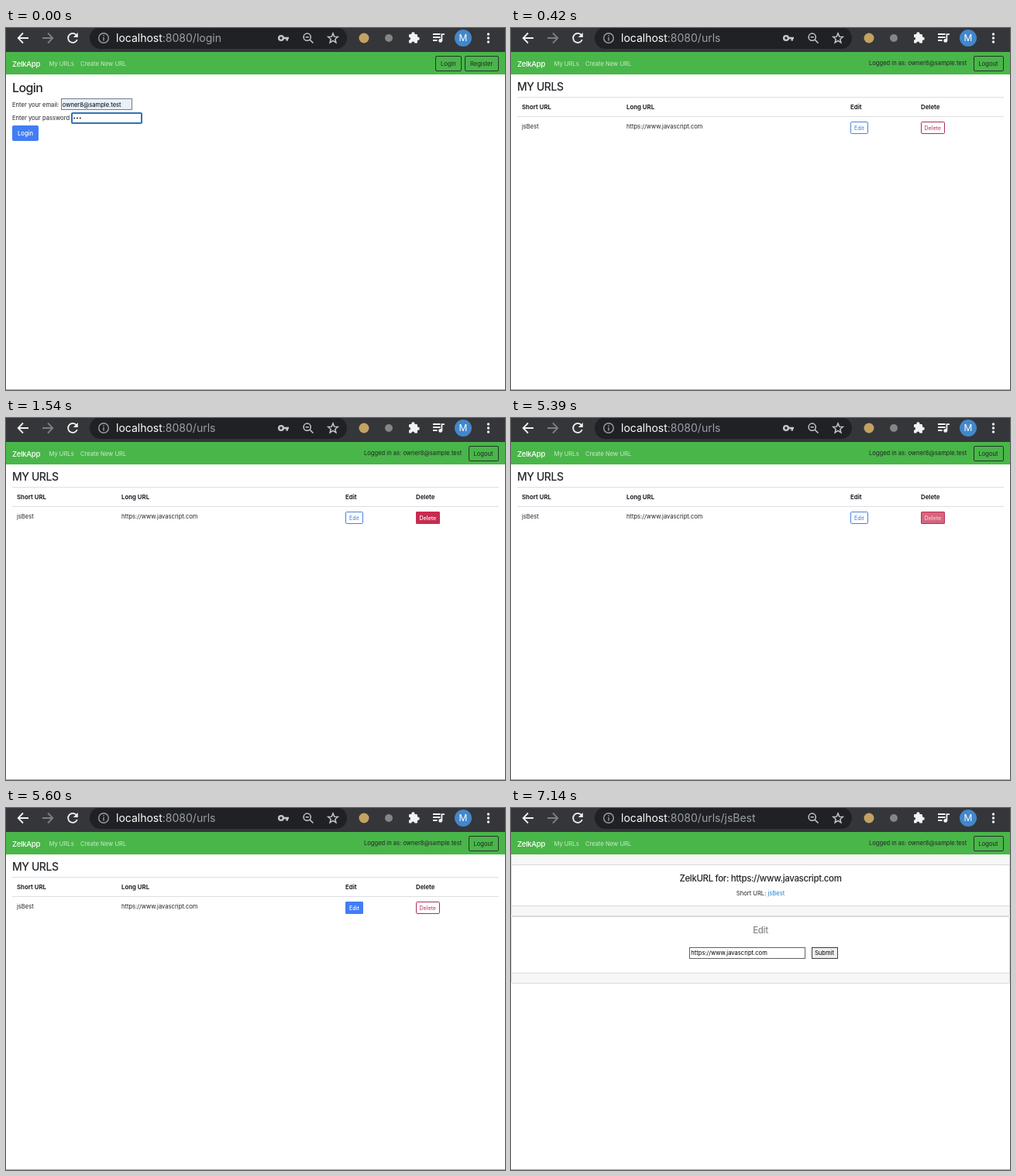
Write an HTML page that moves like this. It is 644 px wide and 468 px high and loops after 8 s.

```html
<!DOCTYPE html>
<html lang="en">
<head>
<meta charset="utf-8">
<title>Short URL app</title>
<style>
html, body { margin: 0; width: 100%; height: 100%; overflow: hidden; background: #fff; }
svg { display: block; width: 644px; height: 468px; font: 7.6px Inter, "Open Sans", sans-serif; fill: #212529; }
text { white-space: pre; }
.url { font-size: 14px; fill: #9aa0a6; }
.host { fill: #fff; }
.brand { font-size: 9.6px; font-weight: 500; letter-spacing: -.3px; fill: #fff; }
.nav { fill: #fff; fill-opacity: .72; }
.h2 { font-size: 16px; font-weight: 500; letter-spacing: -.6px; }
.h3 { font-size: 14px; font-weight: 500; letter-spacing: -.45px; }
.h5 { font-size: 11.5px; font-weight: 500; letter-spacing: -.36px; text-anchor: middle; }
.th { font-size: 7.8px; font-weight: 700; }
.small { font-size: 7.1px; }
.on { fill: #fff; font-weight: 500; }
.line { fill: none; stroke-width: 1.8; }
.dark { fill: none; stroke: #26332b; }
.rule { stroke: #dcdfe2; }
.strip { fill: #f7f7f7; stroke: #d9d9d9; }
</style>
</head>
<body>
<svg viewBox="0 0 644 468">
  <rect width="644" height="468" fill="#fff"/>

  <!-- browser toolbar -->
  <rect width="644" height="31" fill="#35363a"/>
  <rect x="108" y="-1" width="332" height="28" rx="14" fill="#202124"/>
  <g class="line" stroke="#f1f3f4">
    <path d="M29 13H16M22 6.5L15.7 13L22 19.5"/>
    <path d="M47 13H60M54 6.5L60.3 13L54 19.5" stroke="#7d7f83"/>
    <g id="reload">
      <path d="M91.2 9.6A6 6 0 1 0 91.8 15"/>
      <path d="M92.8 6V12H86.8Z" fill="#f1f3f4" stroke="none"/>
    </g>
    <path id="stop" d="M80.8 7.8L91.2 18.2M91.2 7.8L80.8 18.2"/>
  </g>
  <g class="line" stroke="#9aa0a6" style="stroke-width:1.4">
    <circle cx="126" cy="13" r="6.3"/>
    <path d="M126 12V16.6M126 9.2V10.8"/>
  </g>
  <text class="url" x="142" y="18"><tspan class="host">localhost</tspan>:8080<tspan id="path"></tspan></text>
  <g class="line" stroke="#c4c7cb" style="stroke-width:1.5">
    <g id="key">
      <circle cx="355" cy="13" r="2.9" style="stroke-width:2.4"/>
      <path d="M358.5 13H365M362.7 13V16.5" style="stroke-width:2.6"/>
    </g>
    <circle cx="388.7" cy="11.7" r="4.6"/>
    <path d="M392 15L396.5 19.5M386.6 11.7H390.8"/>
    <path id="star"/>
  </g>
  <circle cx="462" cy="13" r="6.5" fill="#c3a262"/>
  <circle cx="494" cy="13" r="5" fill="#858585"/>
  <g fill="#f1f3f4">
    <path d="M520 9.2Q520 8 521.2 8H523.4A2.1 2.1 0 1 1 527.4 8H529.8Q531 8 531 9.2V11.7A2.1 2.1 0 1 1 531 15.7V18.4Q531 19.6 529.8 19.6H527.3A2 2 0 0 0 523.3 19.6H521.2Q520 19.6 520 18.4V15.8A2 2 0 0 0 520 11.8Z"/>
    <circle cx="622.5" cy="8" r="1.7"/><circle cx="622.5" cy="13" r="1.7"/><circle cx="622.5" cy="18" r="1.7"/>
    <circle cx="560.7" cy="16.4" r="2.4"/>
  </g>
  <path class="line" stroke="#f1f3f4" d="M551 8H560.5M551 12H560.5M551 16H556.5M562.4 16.4V8.2H566"/>
  <circle cx="590" cy="13" r="11" fill="#4287cb"/>
  <text x="590" y="17.2" fill="#fff" text-anchor="middle" style="font-size:12px">M</text>

  <!-- site navigation -->
  <rect y="31" width="644" height="29" fill="#49b649"/>
  <text class="brand" x="8" y="50">ZelkApp</text>
  <text class="nav" x="55.5" y="49">My URLs</text>
  <text class="nav" x="96" y="49">Create New URL</text>
  <g id="guest">
    <rect class="dark" x="554.5" y="36.5" width="33" height="19" rx="1.5"/>
    <text x="561" y="49">Login</text>
    <rect class="dark" x="592.5" y="36.5" width="43" height="19" rx="1.5"/>
    <text x="599" y="49">Register</text>
  </g>
  <g id="member">
    <text x="462" y="48">Logged in as: owner8@sample.test</text>
    <rect class="dark" x="597.5" y="36.5" width="38" height="19" rx="1.5"/>
    <text x="603.5" y="49">Logout</text>
  </g>

  <g id="login">
    <text class="h2" x="8" y="83">Login</text>
    <text x="8" y="102">Enter your email:</text>
    <rect x="71.5" y="91.5" width="91" height="14" fill="#e8f0fe" stroke="#767b85"/>
    <text x="72.8" y="102" fill="#000">owner8@sample.test</text>
    <text x="8" y="119">Enter your password</text>
    <rect x="85" y="110" width="90" height="13" rx="1" fill="#fff" stroke="#2f74b5" stroke-width="2"/>
    <circle cx="88.2" cy="116.5" r="1"/><circle cx="92" cy="116.5" r="1"/><circle cx="95.8" cy="116.5" r="1"/>
    <rect id="ring" x="6.5" y="124.5" width="37" height="23" rx="2.5" fill="#a9c8fa"/>
    <rect x="8" y="126" width="34" height="20" rx="2" fill="#427df4"/>
    <rect id="press" x="8" y="126" width="34" height="20" rx="2" fill="#2364d2"/>
    <text class="on" x="15" y="139">Login</text>
  </g>

  <g id="list">
    <text class="h3" x="8" y="81">MY URLS</text>
    <path class="rule" d="M8 89.5H636M8 114.5H636"/>
    <text class="th" x="14" y="105">Short URL</text>
    <text class="th" x="149" y="105">Long URL</text>
    <text class="th" x="438" y="105">Edit</text>
    <text class="th" x="529" y="105">Delete</text>
    <text x="14" y="130">jsBest</text>
    <text x="149" y="130">https://www.javascript.com</text>
    <rect x="438.5" y="121.5" width="22" height="15" rx="1.2" fill="none" stroke="#4a80dc"/>
    <text class="small" x="443" y="132" fill="#3d78dc">Edit</text>
    <g id="edit">
      <rect x="438" y="121" width="23" height="16" rx="1.5" fill="#427df4"/>
      <text class="small on" x="443" y="132">Edit</text>
    </g>
    <rect x="529.5" y="121.5" width="30" height="15" rx="1.2" fill="none" stroke="#ae2c5c"/>
    <text class="small" x="533.5" y="132" fill="#b5345f">Delete</text>
    <g id="remove">
      <rect x="529" y="121" width="31" height="16" rx="1.5" fill="#c72b50"/>
      <text class="small on" x="533.5" y="132">Delete</text>
    </g>
  </g>

  <g id="detail">
    <rect class="strip" x=".5" y="59.5" width="643" height="80" rx="2"/>
    <rect x=".5" y="73.5" width="643" height="53" fill="#fff" stroke="#d9d9d9"/>
    <rect class="strip" x=".5" y="140.5" width="643" height="86" rx="2"/>
    <path d="M.5 213.5V142.5Q.5 140.5 2.5 140.5H641.5Q643.5 140.5 643.5 142.5V213.5Z" fill="#fff" stroke="#d9d9d9"/>
    <rect y="58" width="644" height="2" fill="#49b649"/>
    <text class="h5" x="322" y="95">ZelkURL for: https://www.javascript.com</text>
    <text x="322" y="113" text-anchor="middle">Short URL: <tspan fill="#1f7fdc">jsBest</tspan></text>
    <text class="h5" x="322" y="162" fill="#868686">Edit</text>
    <rect x="230.5" y="180.5" width="149" height="14" fill="#fff" stroke="#626262"/>
    <text x="232.3" y="190" fill="#000">https://www.javascript.com</text>
    <rect x="388.5" y="180.5" width="33" height="14" fill="#efefef" stroke="#3c3c3c"/>
    <text x="392" y="190" fill="#000">Submit</text>
  </g>

  <path d="M0 467.5H644" stroke="#a8a8a8"/>
</svg>
<script>
const LOOP = 8000;
const $ = id => document.getElementById(id);
const show = (id, on) => { $(id).style.display = on ? "" : "none"; };

const spikes = Array.from({ length: 10 }, (_, i) => {
  const a = i * Math.PI / 5 - Math.PI / 2, r = i % 2 ? 2.9 : 6.6;
  return (422 + r * Math.cos(a)).toFixed(2) + " " + (13.5 + r * Math.sin(a)).toFixed(2);
});
$("star").setAttribute("d", "M" + spikes.join("L") + "Z");

// Each step changes only the listed values.
const steps = [
  [0, { page: "login", path: "/login", key: true, busy: false, press: 0, ring: 0, edit: 0, remove: 0 }],
  [140, { press: .5, ring: .5 }],
  [210, { press: 1, ring: 1 }],
  [280, { press: .5, busy: true }],
  [350, { path: "/urls", key: false }],
  [420, { page: "list", key: true, busy: false }],
  [1050, { remove: .06 }],
  [1120, { remove: 0 }],
  [1400, { remove: .35 }],
  [1470, { remove: .8 }],
  [1540, { remove: 1 }],
  [5390, { remove: .72 }],
  [5460, { remove: .2, edit: .2 }],
  [5530, { remove: 0, edit: .7 }],
  [5600, { edit: 1 }],
  [7070, { path: "/urls/jsBest", key: false, busy: true }],
  [7140, { page: "detail", busy: false }]
];
let state = {};
const table = steps.map(([at, change]) => [at, state = { ...state, ...change }]);

let shown;
function draw(now) {
  const t = (now - start + LOOP) % LOOP;
  const s = table.findLast(([at]) => at <= t)[1];
  if (s !== shown) {
    shown = s;
    for (const p of ["login", "list", "detail"]) show(p, s.page === p);
    show("guest", s.page === "login");
    show("member", s.page !== "login");
    show("key", s.key);
    show("reload", !s.busy);
    show("stop", s.busy);
    $("path").textContent = s.path;
    for (const id of ["press", "ring", "edit", "remove"]) $(id).style.opacity = s[id];
  }
  requestAnimationFrame(draw);
}
const start = performance.now();
draw(start);
</script>
</body>
</html>
```
